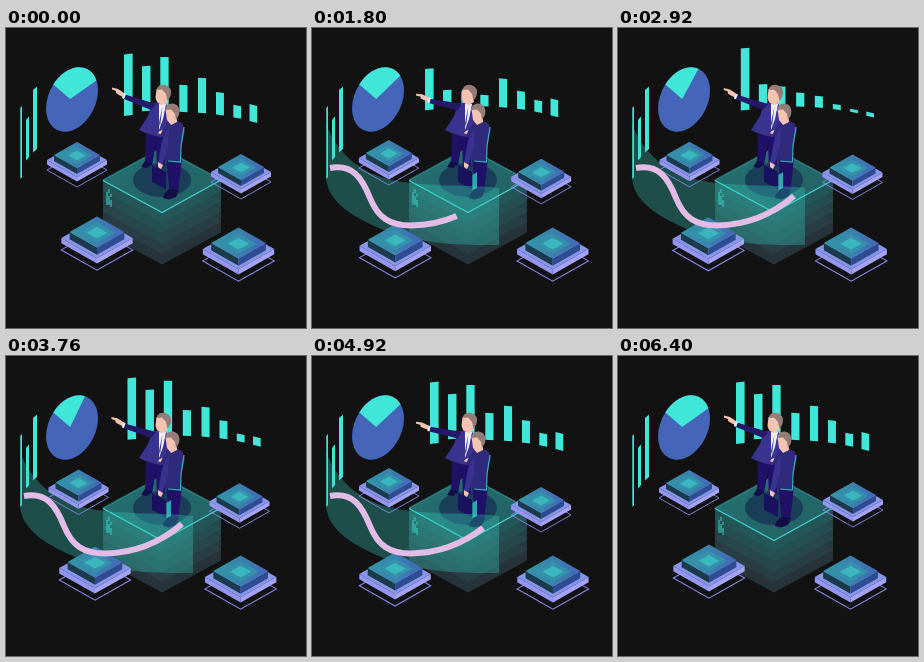
An HTML page that plays this animation: 300x300 px, repeating every 6.44 s.

```html
<!DOCTYPE html>
<html lang="en">
<head>
<meta charset="utf-8">
<title>Isometric analytics</title>
<style>
html, body { margin: 0; width: 100%; height: 100%; overflow: hidden; background: #121212; }
svg { display: block; width: 100vw; height: 100vh; }
</style>
</head>
<body>
<svg viewBox="0 0 300 300">
  <defs>
    <linearGradient id="chip"><stop offset="0" stop-color="#3197a5"/><stop offset=".55" stop-color="#3b7fb0"/><stop offset="1" stop-color="#4368ba"/></linearGradient>
    <linearGradient id="deck" x1="0" y1="0" x2="1" y2="1"><stop offset="0" stop-color="#257173"/><stop offset="1" stop-color="#235f62"/></linearGradient>
    <clipPath id="reveal"><rect id="revealBox" x="14" y="80" width="0" height="150"/></clipPath>
    <g id="pad">
      <path d="M-30 10L0-7 30 10 0 27Z" fill="none" stroke="#8886ea" stroke-width=".9"/>
      <path d="M-30 0L0 17V21.500L-30 4.500Z" fill="#9496f1"/>
      <path d="M30 0L0 17V21.500L30 4.500Z" fill="#a5a3f7"/>
      <path d="M-30 0L0-17 30 0 0 17Z" fill="#8796ea"/>
      <path d="M-23-5L0 8V14L-23 1Z" fill="#1b3a4c"/>
      <path d="M23-5L0 8V14L23 1Z" fill="#2f4c92"/>
      <path d="M-23-5L0-18 23-5 0 8Z" fill="url(#chip)"/>
      <path d="M-15-4.500L0-13 15-4.500 0 4Z" fill="#3590aa"/>
      <path d="M-9-4.500L0-9.500 9-4.500 0 .500Z" fill="#3ab6bf"/>
    </g>
  </defs>

  <g id="bars" fill="#40e6d8"></g>

  <g fill="#40e6d8">
    <path d="M14.3 80L16 78V149L14.3 151Z"/>
    <path d="M20 92L23 88.500V129L20 132.500Z"/>
    <path d="M27 62L31 58.500V121L27 124.500Z"/>
  </g>
  <g transform="matrix(26 -9 0 31 66 71.5)">
    <circle r="1" fill="#4565b8"/>
    <path id="slice" fill="#40e6d8"/>
  </g>

  <g id="stack"></g>
  <path d="M97 152.500L156 120.500 215 152 156 184.500Z" fill="url(#deck)"/>
  <path d="M97 152.500L156 120.500 215 152" fill="none" stroke="#319697" stroke-width=".8"/>
  <path d="M97 152.500L156 184.500 215 152" fill="none" stroke="#3ed0cb" stroke-width="1.400"/>
  <path d="M101 164v13M103 161v4M103 168v9M105 166v3M105 172v7" stroke="#39c9c2" stroke-width="1.100"/>
  <ellipse cx="156" cy="152" rx="29" ry="17" fill="#1a3d58"/>

  <!-- pointing man -->
  <g>
    <path d="M140 106L161 109 159 138 151 140 150 116 146 137 139 135Z" fill="#1f1168"/>
    <path d="M139 133L146 136 141 140 135 139Z" fill="#130f45"/>
    <path d="M146 76Q153 73 160 76L167 85 163 109Q148 110 133 102L142 88Z" fill="#3a3390"/>
    <g id="arm">
      <path d="M150 76L119 66.500 118 71 145 82Z" fill="#241868"/>
      <path d="M120 66L118 71 116 70 117.500 65Z" fill="#f2f2f8"/>
      <path d="M118 65L112 61 106 59.500 106 61.500 110 63 110 65 113 67 117 69Z" fill="#f4c3b2"/>
    </g>
    <path d="M153 76L160 76 157 91 153 102Z" fill="#f0eff8"/>
    <path d="M156.500 78L154 99 153 95Z" fill="#3b3a9c"/>
    <path d="M152 105Q155 100 159 104L157 108Z" fill="#f4c3b2"/>
    <path d="M150.500 61L160 60 162 74 156 77.500 151 74 149.500 70Z" fill="#f4c3b2"/>
    <path d="M150.500 62Q152 56 159 57 167 59 164.500 68L161.500 73 160 66 156 61.500Z" fill="#957c78"/>
  </g>
  <!-- man with briefcase -->
  <g>
    <path d="M160 130L176 131 172 164 164 166Z" fill="#1f1168"/>
    <path d="M163 161L173 162 170 169 163 171.500 157 170 158 166Z" fill="#130f45"/>
    <path d="M146 137L160 144V161L146 154Z" fill="#1a1160"/>
    <path d="M150 139L152 134 157 137 156 142" fill="none" stroke="#2d2878" stroke-width="1.200"/>
    <path d="M161 95Q169 91 176 95L179 102 175.500 118 174.500 135 158 132 160 113 154 107Z" fill="#2f2a7c"/>
    <path d="M163 98L156 113 152 135 156 138 162 117Z" fill="#393390"/>
    <path d="M178 99L175 118 174.500 134 162 133" fill="none" stroke="#36aeb9" stroke-width="1.200"/>
    <path d="M152 134L157 137 155 141 152 139Z" fill="#f4c3b2"/>
    <path d="M159.500 81L170 81 171 94 165 97 161 92Z" fill="#f4c3b2"/>
    <path d="M159 82Q160 75 167 75.500 175 77 173 87L170 92 169 86 165 81.500Z" fill="#957c78"/>
  </g>

  <g clip-path="url(#reveal)" fill="#35d6ca">
    <path d="M14 96C25 125 48 145 80 152S150 156 187 160V217C130 218 92 212 62 198S16 170 14 150Z" fill-opacity=".3"/>
    <path d="M160.500 147L165 144V160L160.500 162Z" fill-opacity=".75"/>
  </g>

  <g id="pads"></g>
  <path id="trend" d="M18 140C41 136 50 150 58 170C66 190 78 197.500 99 197.500C130 197 155 186 176 168" fill="none" stroke="#e2bbe6" stroke-width="6" pathLength="100"/>
</svg>
<script>
const LOOP = 6440;
const NS = "http://www.w3.org/2000/svg";
const $ = id => document.getElementById(id);

function add(parent, tag, attrs) {
  const node = document.createElementNS(NS, tag);
  for (const key in attrs) node.setAttribute(key, attrs[key]);
  return parent.appendChild(node);
}

// Linear value of a keyed track at time t; the last key holds.
function track(times, values, t) {
  const i = times.findIndex(time => time > t);
  if (i < 0) return values[values.length - 1];
  const k = (t - times[i - 1]) / (times[i] - times[i - 1]);
  return values[i - 1] + (values[i] - values[i - 1]) * k;
}

// Swings 0 to 1 and back, twice per loop.
const swayAt = t => (1 - Math.cos(t / LOOP * 4 * Math.PI)) / 2;

// Translucent layers under the deck, deepest first.
for (let i = 5; i >= 1; i--) {
  const y = 152.5 + i * 10.4;
  add($("stack"), "path", {
    d: `M97 ${y - 12}L156 ${y - 44}L215 ${y - 12}V${y}L156 ${y + 32}L97 ${y}Z`,
    fill: `rgb(${36 + i},${96 - i * 8},${98 - i * 7})`, "fill-opacity": .88
  });
}

const KEYS = [0, 800, 1800, 2800, 3760, 4920];
const CHART_X = [0, -3, -5, 5, 3.5, 0];
const CHART_Y = [0, -3.2, -5.7, -5.6, -4.2, 0];
const bars = [
  { x: 118, base: 87.5, height: 61.5, scale: [1, .8, .67, 1.01, 1, 1] },
  { x: 136, base: 83, height: 45, scale: [1, 1, .34, .4, 1, 1] },
  { x: 154.3, base: 86, height: 57, scale: [1, 1, .3, .3, 1, 1] },
  { x: 173.3, base: 84, height: 27, scale: [1, 1, .42, .45, .95, 1] },
  { x: 192, base: 85, height: 35, scale: [1, 1, .82, .25, .85, 1] },
  { x: 210, base: 87, height: 22.5, scale: [1, 1, .8, .14, .8, 1] },
  { x: 227.3, base: 90, height: 12.5, scale: [1, 1, .95, .2, .6, 1] },
  { x: 243.5, base: 94, height: 17, scale: [1, 1, 1, .2, .5, 1] }
].map((bar, i) => ({
  ...bar, width: 8.6 - i * .13, slope: -.8 + i * .38, node: add($("bars"), "path", {})
}));

const pads = [
  { x: 71, y: 132, dx: 6, dy: -2, size: 1 },
  { x: 235, y: 144, dx: -6, dy: 5, size: 1 },
  { x: 91, y: 210, dx: -8, dy: 8, size: 1.19 },
  { x: 232.5, y: 221, dx: 8.5, dy: 0, size: 1.19 }
].map(pad => ({ ...pad, node: add($("pads"), "use", { href: "#pad" }) }));

function drawBars(t) {
  const dx = track(KEYS, CHART_X, t), dy = track(KEYS, CHART_Y, t);
  $("bars").setAttribute("transform", `translate(${dx} ${dy})`);
  for (const { x, base, height, width, slope, scale, node } of bars) {
    const top = base - height * track(KEYS, scale, t), half = slope / 2;
    node.setAttribute("d",
      `M${x} ${top - half}L${x + width} ${top + half}V${base + half}L${x} ${base - half}Z`);
  }
}

function drawSlice(t) {
  const point = deg => {
    const a = deg * Math.PI / 180;
    return `${Math.cos(a)} ${Math.sin(a)}`;
  };
  const end = track([0, 1800, 2920, 3760, 4920, LOOP], [-20, -31, -56, -60, -30, -20], t);
  $("slice").setAttribute("d", `M-.07-.04L${point(-136)}A1 1 0 0 1 ${point(end)}Z`);
}

function drawSway(t) {
  const sway = swayAt(t);
  for (const { x, y, dx, dy, size, node } of pads) {
    node.setAttribute("transform", `translate(${x + dx * sway} ${y + dy * sway}) scale(${size})`);
  }
  $("arm").setAttribute("transform", `rotate(${-8.5 * sway} 148 77)`);
}

function drawTrend(t) {
  $("revealBox").setAttribute("width", track([0, 400, 1150, 5650, 6380, LOOP], [0, 0, 173, 173, 0, 0], t));
  const shown = track([0, 970, 2000, 4890, 5850], [0, 0, 100, 100, 0], t);
  $("trend").setAttribute("stroke-dasharray", `${shown} 200`);
  $("trend").setAttribute("visibility", shown > 0 ? "visible" : "hidden");
}

function render(t) {
  drawBars(t);
  drawSlice(t);
  drawSway(t);
  drawTrend(t);
}

const start = performance.now();
function tick() {
  render((performance.now() - start) % LOOP);
  requestAnimationFrame(tick);
}
tick();
</script>
</body>
</html>
```
